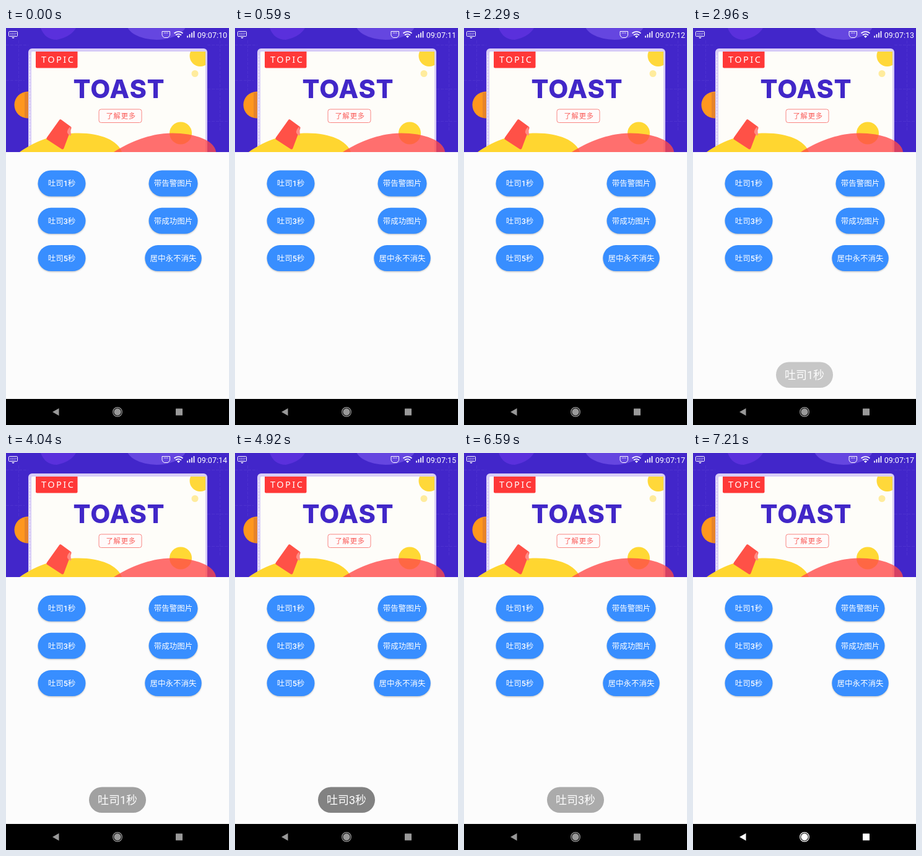
Write an HTML page that moves like this. It is 360 by 640 pixels and loops after 7250 ms.

```html
<!DOCTYPE html>
<html lang="zh-CN">
<head>
<meta charset="utf-8">
<title>Toast</title>
<style>
html, body { margin: 0; width: 100%; height: 100%; overflow: hidden; background: #fcfcfc; }
svg { display: block; font-family: Roboto, "Noto Sans CJK SC", "Noto Sans CJK", sans-serif; }
</style>
</head>
<body>
<svg width="360" height="640" viewBox="0 0 360 640">
  <defs>
    <clipPath id="banner"><path d="M0 0H360V200H0Z"/></clipPath>
    <clipPath id="page"><path d="M41 38H322V200H41Z"/></clipPath>
    <filter id="soft" x="-20%" y="-20%" width="140%" height="150%"><feGaussianBlur stdDeviation="1"/></filter>
  </defs>
  <rect width="360" height="640" fill="#fcfcfc"/>

  <g clip-path="url(#banner)">
    <rect width="360" height="200" fill="#4226ca"/>
    <path d="M0 27.5H36M0 84.5H30M20.5 20V102M325 27.5H360M325 98.5H360M345.5 20V165M325 150.5H360" fill="none" stroke="#5b42d6" stroke-opacity=".45" stroke-dasharray="5 2"/>
    <path d="M56 0Q63 19 82 19Q105 14 113 0Z" fill="#5a30dc"/>
    <ellipse cx="243" cy="-9" rx="49" ry="28" fill="#6546e0"/>
    <circle cx="35" cy="124" r="21.5" fill="#ff971e"/>
    <path d="M30 104H37V145H30Z" fill="#d97a34" fill-opacity=".65"/>
    <rect x="36" y="33" width="289" height="180" rx="6" fill="#d8cdf7"/>
    <rect x="41" y="38" width="281" height="175" rx="2" fill="#fefdf9"/>
    <path d="M38.500 44V200" stroke="#f4f0fd" stroke-dasharray="3 2"/>
    <g clip-path="url(#page)">
      <circle cx="313.500" cy="45" r="17" fill="#ffd83a"/>
      <circle cx="305" cy="73.500" r="5.500" fill="#ffec9d"/>
    </g>
    <path d="M48 38H115.500V62.500Q115.500 64.500 113.500 64.500H50Q48 64.500 48 62.500Z" fill="#ff3838"/>
    <text x="57" y="56.300" font-size="14.500" letter-spacing="2.500" fill="#fff" font-family="'Noto Sans', 'Open Sans', sans-serif">TOPIC</text>
    <text x="182.500" y="113" text-anchor="middle" font-family="Inter, sans-serif" font-weight="800" font-size="41.500" letter-spacing="1" fill="#4127c8">TOAST</text>
    <rect x="150" y="131" width="69" height="21.500" rx="3.500" fill="#fffafa" stroke="#f98783"/>
    <text x="161.500" y="146" font-size="11.300" letter-spacing=".8" fill="#fa5f5c">了解更多</text>
    <circle cx="282" cy="169.500" r="18" fill="#ffd834"/>
    <path d="M22 200C50 180 84 169.500 117 169.500C154 169.500 181 182 187 200Z" fill="#ffd630"/>
    <path d="M174 200C199 184 234 169.500 268 169.500C305 169.500 337 181 339 200Z" fill="#ff4848" fill-opacity=".78"/>
    <path d="M88 150L103 161L91 193L68 178Z" fill="#ff5147" stroke="#ff5147" stroke-width="5" stroke-linejoin="round"/>
    <path d="M104 159Q98 164 99 169Q102 174 105 173Z" fill="#ff8b84"/>
  </g>

  <g fill="none" stroke="#fff">
    <rect x="4.500" y="5.500" width="14" height="8" rx="1"/>
    <path d="M7 8.500H17M7 11H16" stroke-dasharray="1.500 1.200"/>
    <path d="M9 15H14L11.500 17Z" fill="#fff" stroke="none"/>
    <path d="M252 5.500H264.500V11.500Q264 14 261 15.500H255.500Q252.500 14 252 11.500Z"/>
    <path d="M255 8H262" stroke-dasharray="1.500 1"/>
    <path d="M271.500 8.500Q278.500 3 285.500 8.500M274 11.500Q278.500 8 283 11.500" stroke-width="1.700"/>
    <path d="M276 13.200Q278.500 11.500 281 13.200L278.500 16Z" fill="#fff" stroke="none"/>
    <path d="M293 15.500V12.500M296.500 15.500V10M300 15.500V7.500M303.500 15.500V5" stroke-width="1.700"/>
  </g>
  <text id="clock" x="357" y="15.500" text-anchor="end" font-size="12.500" fill="#fff"></text>

  <g id="buttons" font-size="12.500" font-weight="500" text-anchor="middle"></g>

  <g id="toast">
    <rect x="134" y="538.500" width="92" height="41.500" rx="20.750" fill="#666"/>
    <text id="message" x="180" y="566" font-size="18" fill="#fff" text-anchor="middle"></text>
  </g>

  <rect y="594" width="360" height="4" fill="#fff"/>
  <rect y="598" width="360" height="42" fill="#000"/>
  <g id="nav">
    <path d="M75 619L85.500 613V625Z"/>
    <circle cx="180" cy="619" r="5.700"/>
    <circle cx="180" cy="619" r="7.400" fill="none" stroke-width="1.200"/>
    <rect x="274" y="613.500" width="11" height="11" rx=".6"/>
  </g>
</svg>
<script>
const LOOP = 7250;
const FADE = 500;
const CLOCK_TICK = 340;
const TOASTS = [
  { text: '吐司1秒', show: 2866, hide: 3724 },
  { text: '吐司3秒', show: 4640, hide: 6250 }
];
const NAV_WAKE = { start: 6700, length: 250 };

const byId = id => document.getElementById(id);
const [clock, toast, message, nav] = ['clock', 'toast', 'message', 'nav'].map(byId);
const clamp = v => Math.min(1, Math.max(0, v));

function button(center, row, width, label) {
  const x = center - width / 2;
  const y = 229.5 + row * 60.3;
  return `<rect x="${x}" y="${y + 1.3}" width="${width}" height="42" rx="21" fill="#000" opacity=".2" filter="url(#soft)"/>
    <rect x="${x}" y="${y}" width="${width}" height="42" rx="21" fill="#388eff"/>
    <text x="${center}" y="${y + 25.7}" fill="#fff">${label}</text>`;
}

byId('buttons').innerHTML = [
  [90, 0, 77, '吐司1秒'], [90, 1, 77, '吐司3秒'], [90, 2, 77, '吐司5秒'],
  [270, 0, 79, '带告警图片'], [270, 1, 79, '带成功图片'], [270, 2, 91.5, '居中永不消失']
].map(args => button(...args)).join('');

// Decelerating entrance, accelerating exit.
function toastAlpha({ show, hide }, t) {
  const enter = clamp((t - show) / FADE);
  const leave = clamp((t - hide) / FADE);
  return (1 - (1 - enter) ** 2) * (1 - leave ** 2);
}

function render(t) {
  const seconds = 11 + Math.floor((t - CLOCK_TICK) / 1000);
  clock.textContent = `09:07:${seconds}`;

  const current = TOASTS.find(item => t >= item.show && t < item.hide + FADE);
  toast.setAttribute('opacity', current ? toastAlpha(current, t) : 0);
  message.textContent = current ? current.text : '';

  const wake = clamp((t - NAV_WAKE.start) / NAV_WAKE.length);
  const level = Math.round(153 + 102 * wake);
  const color = `rgb(${level},${level},${level})`;
  nav.setAttribute('fill', color);
  nav.setAttribute('stroke', color);
  nav.setAttribute('stroke-width', 0);
}

const start = performance.now();
function tick() {
  render((performance.now() - start) % LOOP);
  requestAnimationFrame(tick);
}
tick();
</script>
</body>
</html>
```
